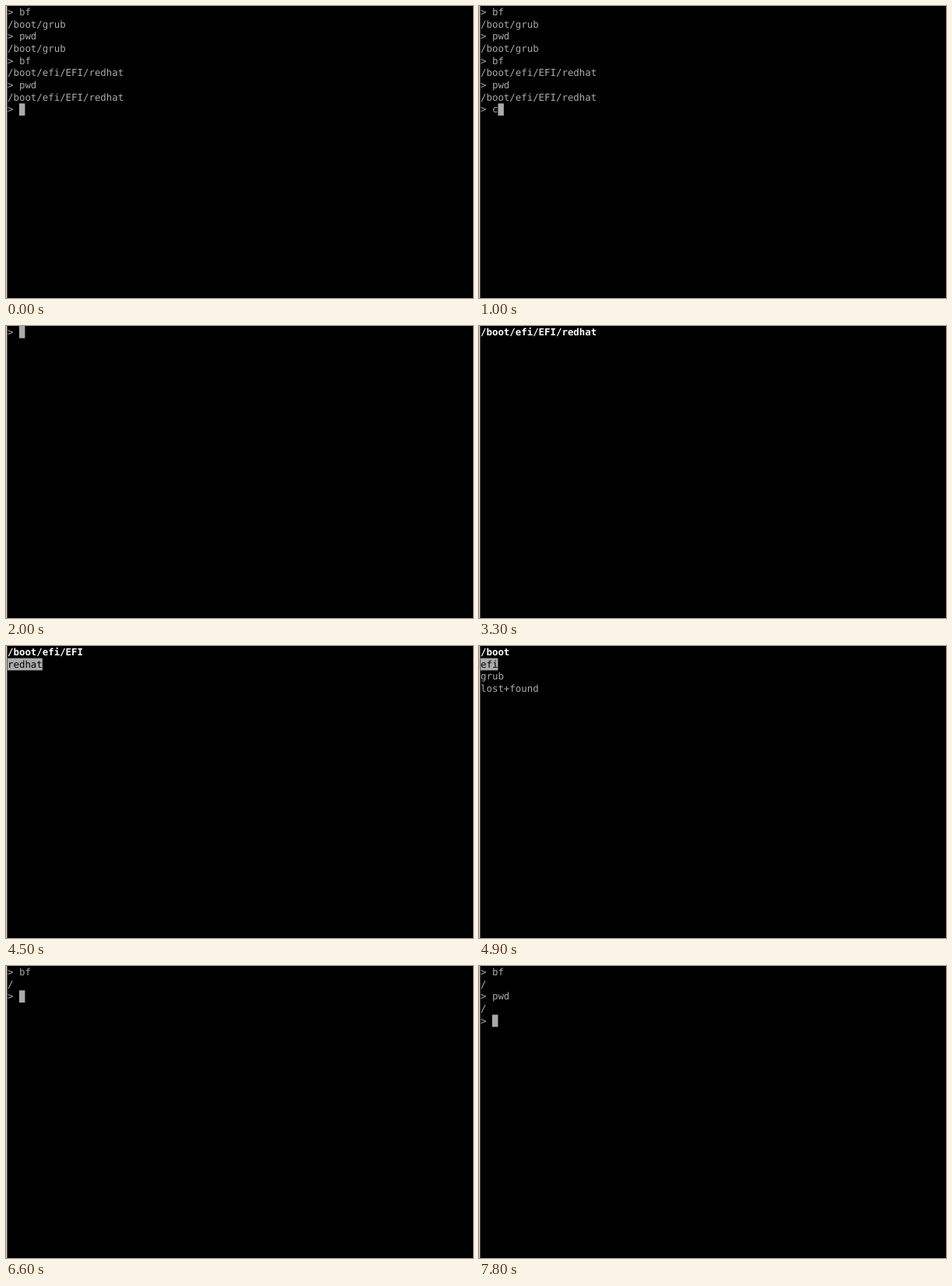
Write an HTML page that moves like this. It is 600 px wide and 376 px high and loops after 8000 ms.

```html
<!DOCTYPE html>
<html lang="en">
<head>
<meta charset="utf-8">
<title>Terminal folder browser</title>
<style>
  html, body { margin: 0; width: 100%; height: 100%; overflow: hidden; background: #000; }
  svg { display: block; width: 600px; height: 376px; background: #000; }
  text {
    font: 12.4px "DejaVu Sans Mono", monospace;
    fill: #aaa;
    white-space: pre;
    text-rendering: geometricPrecision;
  }
  .head { font-weight: bold; fill: #fff; }
  .picked { fill: #000; }
  .block { fill: #aaa; }
  .edge { fill: #d8d8d8; }
</style>
</head>
<body>
<svg viewBox="0 0 600 376">
  <g id="screen"></g>
  <rect class="edge" width="1.4" height="376"/>
</svg>
<script>
const LOOP = 8000;
const CELL = 7.465, ROW = 15.68, LEFT = 2, BASE = 12;
const screen = document.getElementById('screen');

const deep = '/boot/efi/EFI/redhat';
const history = ['> bf', '/boot/grub', '> pwd', '/boot/grub', '> bf', deep, '> pwd', deep];
const rootDirs = ('bin boot cgroup data dev etc home lib lib64 localbackup lost+found media ' +
  'misc mnt net netapplications opt proc project root sbin selinux').split(' ');

// Each step: start time and the screen shown from then on.
const steps = [];
const shell = (time, lines, typed = '') => steps.push({ time, lines: [...lines, '> ' + typed], cursor: true });
const browse = (time, path, dirs = []) => steps.push({ time, lines: [path, ...dirs], browser: true });
const type = (start, lines, word) =>
  [...word].forEach((_, i) => shell(start + i * 100, lines, word.slice(0, i + 1)));

shell(0, history);
type(1000, history, 'clear');
shell(2000, []);
type(3000, [], 'bf');
browse(3300, deep);
browse(4500, '/boot/efi/EFI', ['redhat']);
browse(4700, '/boot/efi', ['EFI']);
browse(4900, '/boot', ['efi', 'grub', 'lost+found']);
browse(5700, '/', rootDirs);
shell(6600, ['> bf', '/']);
type(7400, ['> bf', '/'], 'pwd');
shell(7800, ['> bf', '/', '> pwd', '/']);

function add(tag, attrs, content = '') {
  const node = document.createElementNS('http://www.w3.org/2000/svg', tag);
  for (const key in attrs) node.setAttribute(key, attrs[key]);
  node.textContent = content;
  screen.append(node);
}

function block(col, row, cells) {
  add('rect', {
    class: 'block', x: LEFT + col * CELL, y: row * ROW,
    width: cells * CELL, height: ROW
  });
}

function draw({ lines, cursor, browser }) {
  screen.replaceChildren();
  lines.forEach((line, row) => {
    const picked = browser && row === 1;
    if (picked) block(0, row, line.length);
    const look = picked ? 'picked' : browser && row === 0 ? 'head' : 'plain';
    add('text', { class: look, x: LEFT, y: row * ROW + BASE }, line);
  });
  if (cursor) block(lines.at(-1).length, lines.length - 1, 1);
}

let shown;
const start = performance.now();
function tick() {
  const time = (performance.now() - start) % LOOP;
  const step = steps.findLast(s => s.time <= time);
  if (step !== shown) draw(shown = step);
  requestAnimationFrame(tick);
}
tick();
</script>
</body>
</html>
```
